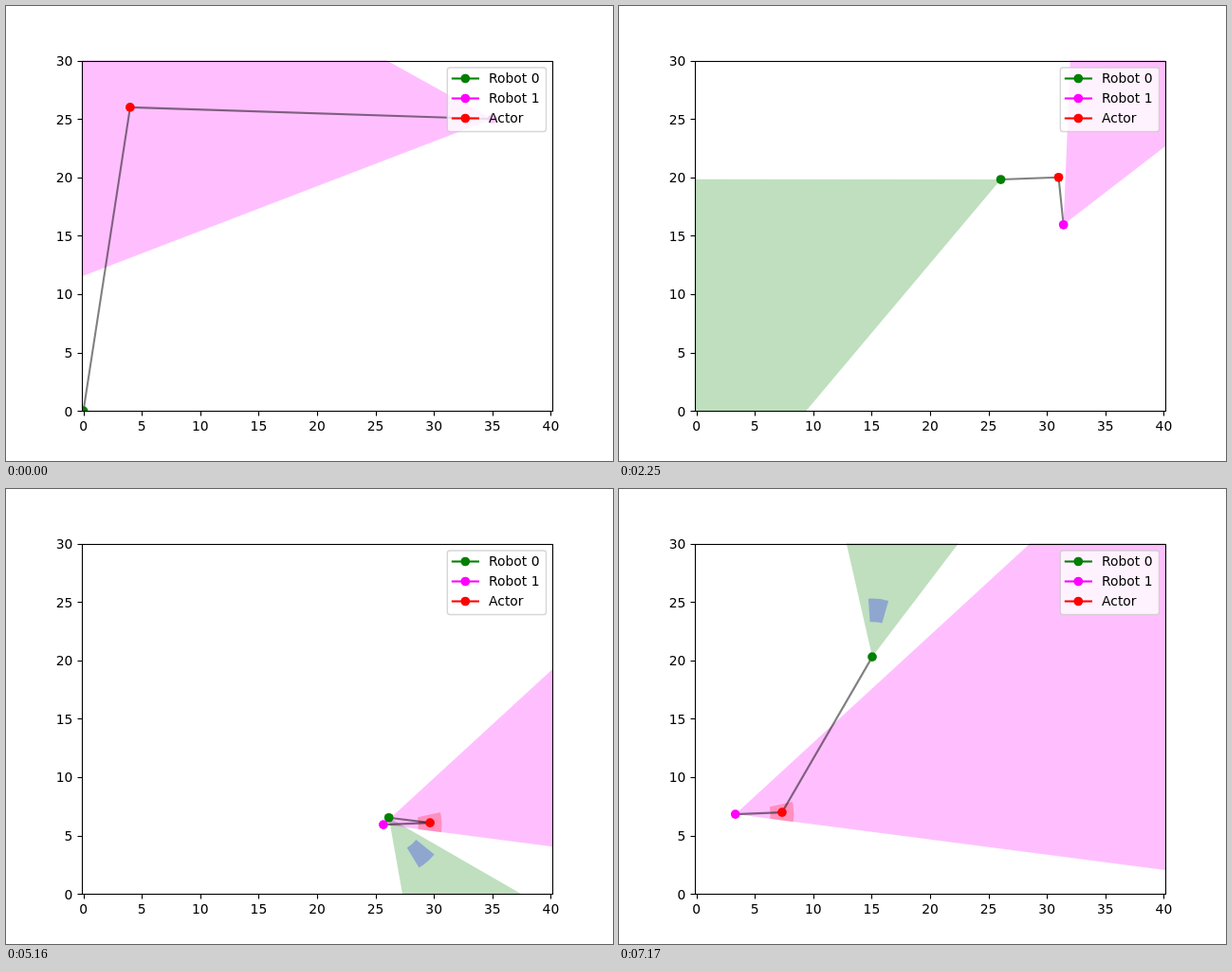
Animation, 640 px wide and 480 px high, one loop 7.2 s. Source, as an HTML page with a canvas:

```html
<!DOCTYPE html>
<html>
<head>
<meta charset="utf-8">
<style>
html, body { margin: 0; width: 100%; height: 100%; overflow: hidden; background: #fff; }
canvas { display: block; }
</style>
</head>
<body>
<canvas id="stage" width="640" height="480"></canvas>
<script>
const ctx = document.getElementById('stage').getContext('2d');
const STEP = 30, STEPS = 240, UNIT = 12.32, TAU = Math.PI * 2;
const GREEN = '#008000', MAGENTA = '#ff00ff', RED = '#ff0000', BLUE = '#0000ff';
const rad = d => d * Math.PI / 180;
const px = x => 328 + (x - 20) * UNIT;
const py = y => 427.2 - y * UNIT;
const clamp01 = v => Math.max(0, Math.min(1, v));
const mix = (a, b, u) => a + (b - a) * clamp01(u);
const wrap = a => ((a % TAU) + TAU) % TAU;

// Actor: straight legs between waypoints [step, x, y]
const ROUTE = [[0, 4, 26], [75, 31, 20], [165, 32, 6], [240, 7, 7]];
function actorAt(k) {
  let i = 0;
  while (i < 2 && k >= ROUTE[i + 1][0]) i++;
  const [t0, x0, y0] = ROUTE[i], [t1, x1, y1] = ROUTE[i + 1];
  const u = (k - t0) / (t1 - t0);
  return { x: x0 + (x1 - x0) * u, y: y0 + (y1 - y0) * u };
}

// Pose on a ring of radius 4 around the actor
function around(k, angle, h) {
  const a = actorAt(k);
  return { x: a.x + 4 * Math.cos(angle), y: a.y + 4 * Math.sin(angle), h };
}

// Turn - straight - turn path at constant speed; side +1 is left, -1 is right
const R = 0.7;
function turnPath(t0, a, s1, t1, b, s2) {
  const centre = (p, s) => ({ x: p.x - s * R * Math.sin(p.h), y: p.y + s * R * Math.cos(p.h) });
  const onArc = (c, s, h) => ({ x: c.x + s * R * Math.sin(h), y: c.y - s * R * Math.cos(h), h });
  const c1 = centre(a, s1), c2 = centre(b, s2);
  const dx = c2.x - c1.x, dy = c2.y - c1.y, d = Math.hypot(dx, dy), off = (s2 - s1) * R;
  const h = Math.atan2(dy, dx) - Math.asin(off / d);
  const line = Math.sqrt(d * d - off * off);
  const arc1 = R * wrap(s1 * (h - a.h)), arc2 = R * wrap(s2 * (b.h - h));
  const from = onArc(c1, s1, h), total = arc1 + line + arc2;
  return k => {
    let q = clamp01((k - t0) / (t1 - t0)) * total;
    if (q < arc1) return onArc(c1, s1, a.h + s1 * q / R);
    q -= arc1;
    if (q < line) return { x: from.x + q * Math.cos(h), y: from.y + q * Math.sin(h), h };
    return onArc(c2, s2, h + s2 * (q - line) / R);
  };
}

const MEET = 78.1, LEAVE = 120, SWAP = 162;
const DOWN = Math.atan2(-14, 1), SIDE = DOWN - Math.PI / 2;
const LAST = Math.atan2(-1, -25);
const join0 = turnPath(0, { x: 0, y: 0, h: 0 }, 1, MEET, around(MEET, SIDE, DOWN), -1);
const join1 = turnPath(0, { x: 35, y: 25, h: rad(-4) }, -1, MEET, around(MEET, DOWN, DOWN), 1);
const cross1 = turnPath(LEAVE, around(LEAVE, DOWN, DOWN), -1, SWAP, around(SWAP, SIDE, DOWN), 1);
const away0 = turnPath(SWAP, around(SWAP, SIDE, DOWN), -1, 239, { x: 15.05, y: 20.3, h: rad(257.8) }, 1);

// Each robot: position, view angle, red zone half-width, blue zone angle
function robot0(k) {
  if (k < MEET) {
    const p = join0(k);
    return { ...p, view: p.h + Math.PI };
  }
  if (k < SWAP) {
    return {
      ...around(k, SIDE, DOWN),
      view: DOWN + Math.PI - mix(0, Math.PI / 2, (k - MEET) / 10),
      red: 15, half: 15,
      blue: k < LEAVE ? DOWN + Math.PI : null
    };
  }
  const p = away0(k);
  const view = p.h + Math.PI - mix(Math.PI / 2, 0, (k - SWAP) / 10);
  return { ...p, view, half: 10, blue: view + rad(6) };
}

function robot1(k) {
  if (k < MEET) {
    const p = join1(k);
    return { ...p, view: p.h + Math.PI };
  }
  if (k < LEAVE) {
    return { ...around(k, DOWN, DOWN), view: DOWN + Math.PI, red: 15, half: 15, blue: DOWN + Math.PI / 2 };
  }
  if (k < SWAP) {
    const p = cross1(k);
    return { ...p, view: p.h + Math.PI, half: 15, blue: p.h + Math.PI / 2 };
  }
  const angle = mix(SIDE + TAU, LAST + TAU, (k - SWAP) / 3);
  return { ...around(k, angle, DOWN), view: rad(mix(94.1, 17.6, (k - SWAP) / 8)), red: 10 };
}

function sector(p, angle, half, r0, r1, color) {
  const x = px(p.x), y = py(p.y), a = -angle - rad(half), b = -angle + rad(half);
  ctx.beginPath();
  ctx.arc(x, y, r1 * UNIT, a, b);
  if (r0) ctx.arc(x, y, r0 * UNIT, b, a, true);
  else ctx.lineTo(x, y);
  ctx.closePath();
  ctx.globalAlpha = 0.25;
  ctx.fillStyle = color;
  ctx.fill();
  ctx.globalAlpha = 1;
}

function zones(p, actor, color) {
  sector(p, p.view, 25, 0, 100, color);
  if (p.red) sector(p, Math.atan2(actor.y - p.y, actor.x - p.x), p.red, 3, 5, RED);
  if (p.blue != null) sector(p, p.blue, p.half, 3, 5, BLUE);
}

function stroke(x0, y0, x1, y1, color, width) {
  ctx.beginPath();
  ctx.moveTo(x0, y0);
  ctx.lineTo(x1, y1);
  ctx.strokeStyle = color;
  ctx.lineWidth = width;
  ctx.stroke();
}

function dot(x, y, color) {
  ctx.beginPath();
  ctx.arc(x, y, 4.86, 0, TAU);
  ctx.fillStyle = color;
  ctx.fill();
}

function label(text, x, y, align) {
  ctx.font = '13.89px "DejaVu Sans", sans-serif';
  ctx.textAlign = align;
  ctx.fillStyle = '#000';
  ctx.fillText(text, x, y);
}

function axes() {
  ctx.strokeStyle = '#000';
  ctx.lineWidth = 1.11;
  ctx.strokeRect(80.5, 58.5, 496, 369);
  for (let v = 0; v <= 40; v += 5) {
    const x = Math.round(px(v)) + 0.5;
    stroke(x, 428, x, 432.5, '#000', 1.11);
    label(v, px(v), 448, 'center');
  }
  for (let v = 0; v <= 30; v += 5) {
    const y = Math.round(py(v)) + 0.5;
    stroke(75.5, y, 80, y, '#000', 1.11);
    label(v, 70.3, py(v) + 5.3, 'right');
  }
}

function legend() {
  ctx.beginPath();
  ctx.roundRect(465.3, 65, 104.2, 67.5, 2.8);
  ctx.globalAlpha = 0.8;
  ctx.fillStyle = '#fff';
  ctx.fill();
  ctx.strokeStyle = '#ccc';
  ctx.lineWidth = 1.39;
  ctx.stroke();
  ctx.globalAlpha = 1;
  [['Robot 0', GREEN], ['Robot 1', MAGENTA], ['Actor', RED]].forEach(([name, color], i) => {
    const y = 76.5 + i * 21;
    stroke(469.8, y, 499, y, color, 2.08);
    dot(484.3, y, color);
    label(name, 509, 81 + i * 21, 'left');
  });
}

function draw(k) {
  const a = actorAt(k), r0 = robot0(k), r1 = robot1(k);
  ctx.fillStyle = '#fff';
  ctx.fillRect(0, 0, 640, 480);
  ctx.save();
  ctx.beginPath();
  ctx.rect(80, 57.6, 496, 369.6);
  ctx.clip();
  zones(r0, a, GREEN);
  zones(r1, a, MAGENTA);
  for (const p of [r0, r1]) {
    stroke(px(p.x), py(p.y), px(a.x), py(a.y), 'rgba(0,0,0,0.5)', 2.08);
  }
  dot(px(r0.x), py(r0.y), GREEN);
  dot(px(r1.x), py(r1.y), MAGENTA);
  dot(px(a.x), py(a.y), RED);
  ctx.restore();
  axes();
  legend();
}

const start = performance.now();
function tick() {
  const t = Math.max(0, performance.now() - start);
  draw(Math.floor(t / STEP) % STEPS);
  requestAnimationFrame(tick);
}
tick();
</script>
</body>
</html>
```
